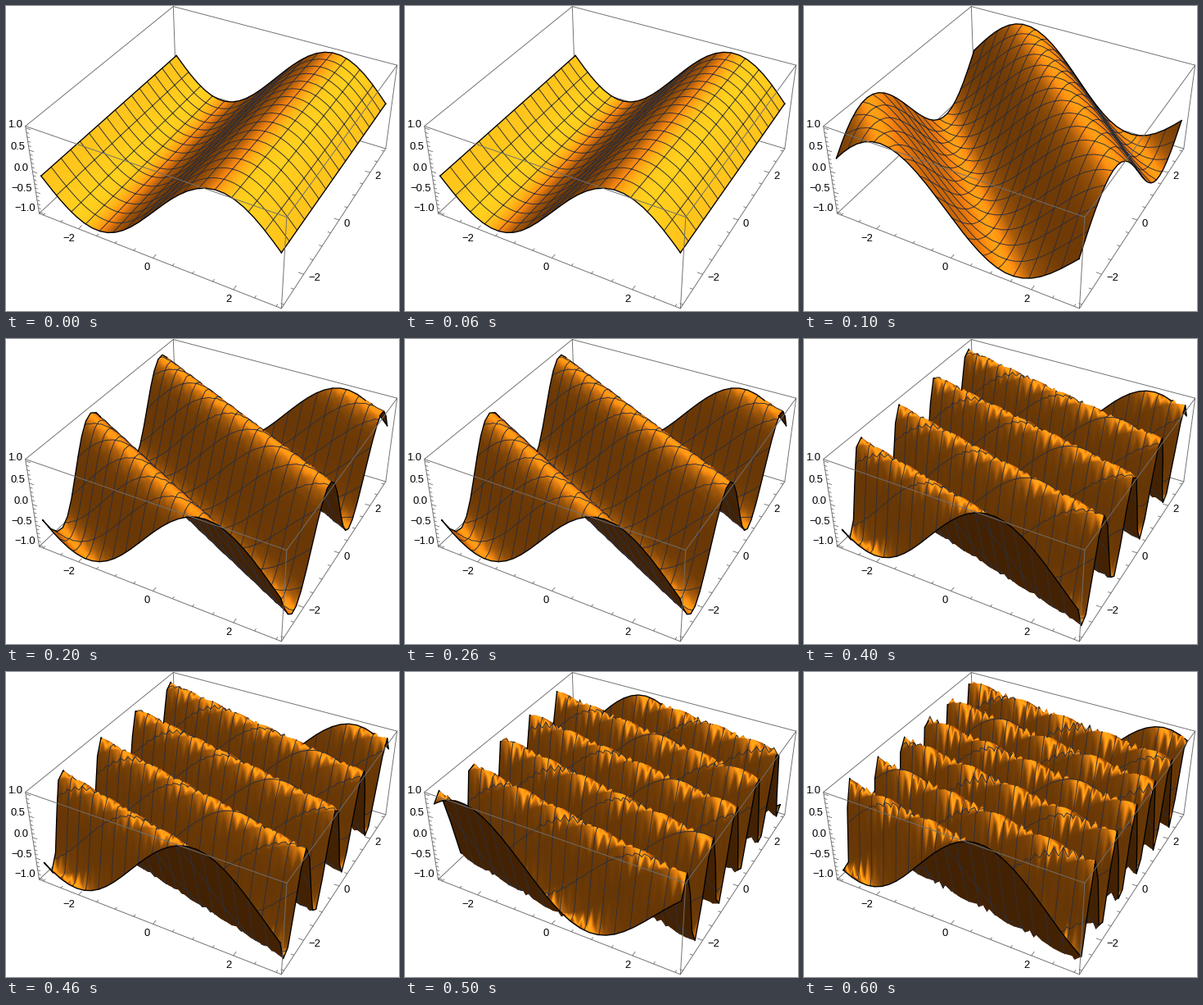
A matplotlib script for the animation above (700 ms loop, 480 px wide and 372 px high).

```python
import numpy as np
import matplotlib.pyplot as plt
from matplotlib.animation import FuncAnimation

W, H, SS = 480, 372, 2
PX = 0.72                      # one pixel in points at 100 dpi
R, PAD = 3.0, 1.04             # plot range and box padding
CELLS = 28
STEP = 2 * R / CELLS
FRAMES = 7

# camera: box of 1 x 1 x 0.4 seen in perspective
EYE = np.array([1.3, -2.4, 2.0])
DIST = np.linalg.norm(EYE)
BACK = EYE / DIST
RIGHT = np.cross([0, 0, 1], BACK)
RIGHT /= np.linalg.norm(RIGHT)
CAM = np.array([RIGHT, np.cross(BACK, RIGHT), BACK])
ZOOM, CX, CY = 1091, 262, 161.4

# material and lights
BASE = np.array([0.8807, 0.6110, 0.1421])
AMBIENT = np.array([0.3010, 0.2241, 0.0905])
LAMP = 0.3 * BASE
LIGHTS = np.array([[0, 1, 1], [1, 1, 1], [1, 0, 1]], float)
LIGHTS /= np.linalg.norm(LIGHTS, axis=1)[:, None]


def project(x, y, z):
    """Data coordinates to pixel x, pixel y and depth."""
    p = np.stack(np.broadcast_arrays(x / (2 * R * PAD), y / (2 * R * PAD),
                                     0.2 * z / PAD), -1) @ CAM.T
    depth = DIST - p[..., 2]
    return CX + ZOOM * p[..., 0] / depth, CY - ZOOM * p[..., 1] / depth, depth


def wave(x, y, k):
    return np.sin(x + k * y)


def on_mesh(k, x, y):
    """Height of the triangulated surface: each cell is cut by both diagonals."""
    s, t = (x + R) / STEP, (y + R) / STEP
    i = np.clip(np.floor(s + 1e-9), 0, CELLS - 1)
    j = np.clip(np.floor(t + 1e-9), 0, CELLS - 1)
    p, q = s - i - 0.5, t - j - 0.5

    def at(di, dj):
        return wave((i + di) * STEP - R, (j + dj) * STEP - R, k)

    return ((1 - 2 * np.maximum(abs(p), abs(q))) * at(0.5, 0.5)
            + np.maximum(-p - q, 0) * at(0, 0) + np.maximum(p - q, 0) * at(1, 0)
            + np.maximum(q - p, 0) * at(0, 1) + np.maximum(p + q, 0) * at(1, 1))


def vertices(k, start, count):
    """Screen positions and camera space normals of a square lattice."""
    g = start + STEP * np.arange(count)
    x, y = np.meshgrid(g, g, indexing="ij")
    u, v, d = project(x, y, wave(x, y, k))
    slope = 1.2 * np.cos(x + k * y)
    n = np.stack([-slope, -k * slope, np.ones_like(x)], -1)
    n /= np.linalg.norm(n, axis=-1, keepdims=True)
    return np.concatenate([np.stack([u * SS, v * SS, d], -1), n @ CAM.T], -1)


def triangles(k):
    corner = vertices(k, -R, CELLS + 1)
    centre = vertices(k, -R + STEP / 2, CELLS)
    for i in range(CELLS):
        for j in range(CELLS):
            ring = (corner[i, j], corner[i + 1, j],
                    corner[i + 1, j + 1], corner[i, j + 1])
            for n in range(4):
                yield ring[n], ring[(n + 1) % 4], centre[i, j]


def rasterize(k):
    depth = np.full((H * SS, W * SS), np.inf)
    norm = np.zeros((H * SS, W * SS, 3))
    for tri in triangles(k):
        tri = np.array(tri)
        (x0, y0, d0), (x1, y1, d1), (x2, y2, d2) = tri[:, :3].tolist()
        area = (x1 - x0) * (y2 - y0) - (y1 - y0) * (x2 - x0)
        if abs(area) < 1e-9:
            continue
        xa, xb = max(int(min(x0, x1, x2)), 0), min(int(max(x0, x1, x2)) + 1, W * SS)
        ya, yb = max(int(min(y0, y1, y2)), 0), min(int(max(y0, y1, y2)) + 1, H * SS)
        px = np.arange(xa, xb) + 0.5 - x0
        py = (np.arange(ya, yb) + 0.5 - y0)[:, None]
        w1 = (px * (y2 - y0) - py * (x2 - x0)) / area
        w2 = (py * (x1 - x0) - px * (y1 - y0)) / area
        w0 = 1 - w1 - w2
        d = w0 * d0 + w1 * d1 + w2 * d2
        zone = depth[ya:yb, xa:xb]
        hit = (w0 >= -1e-6) & (w1 >= -1e-6) & (w2 >= -1e-6) & (d < zone)
        zone[hit] = d[hit]
        w = np.stack([w0[hit], w1[hit], w2[hit]], -1)
        side = -1 if area > 0 else 1       # the underside is lit from its own side
        norm[ya:yb, xa:xb][hit] = side * (w @ tri[:, 3:])
    return depth, norm


def shade(n):
    n = n / np.linalg.norm(n, axis=1)[:, None]
    diffuse = np.zeros(len(n))
    gloss = np.zeros(len(n))
    for light in LIGHTS:
        half = light + [0, 0, 1]
        half /= np.linalg.norm(half)
        lit = n @ light
        diffuse += np.clip(lit, 0, None)
        gloss += np.where(lit > 0, np.clip(n @ half, 0, None) ** 3, 0)
    rgb = BASE * (AMBIENT + diffuse[:, None] * LAMP) + gloss[:, None] * LAMP
    return np.clip(rgb, 0, 1)


def visible_lines(k, depth, levels):
    """Screen path of the constant x and y lines, NaN where hidden."""
    pad = np.pad(depth, 1, mode="edge")
    far = np.max([pad[a:a + H * SS, b:b + W * SS]
                  for a in range(3) for b in range(3)], axis=0)
    run = np.linspace(-R, R, CELLS * 40 + 1)
    xs, ys = [], []
    for level in levels:
        fixed = np.full_like(run, level)
        for x, y in ((run, fixed), (fixed, run)):
            u, v, d = project(x, y, on_mesh(k, x, y))
            col = np.clip((u * SS).astype(int), 0, W * SS - 1)
            row = np.clip((v * SS).astype(int), 0, H * SS - 1)
            seen = d <= far[row, col] + 0.004
            xs += [np.where(seen, u, np.nan), [np.nan]]
            ys += [np.where(seen, v, np.nan), [np.nan]]
    return np.concatenate(xs), np.concatenate(ys)


def build(k):
    depth, norm = rasterize(k)
    hit = np.isfinite(depth)
    rgba = np.zeros((H * SS, W * SS, 4))
    rgba[hit, :3] = shade(norm[hit])
    rgba[hit, 3] = 1
    rgba = rgba.reshape(H, SS, W, SS, 4).mean(axis=(1, 3))
    rgba[..., :3] /= np.maximum(rgba[..., 3:], 1e-6)

    inner = np.linspace(-R, R, 17)[1:-1]
    return (np.clip(rgba, 0, 1), visible_lines(k, depth, inner),
            visible_lines(k, depth, (-R, R)))


fig = plt.figure(figsize=(W / 100, H / 100), dpi=100, facecolor="white")
ax = fig.add_axes([0, 0, 1, 1])
ax.set_xlim(0, W)
ax.set_ylim(H, 0)
ax.axis("off")

B, T = R * PAD, PAD
GRAY = "#707070"


def segment(p, q, order, width=0.95):
    ends = np.array([p, q], float)
    u, v, _ = project(ends[:, 0], ends[:, 1], ends[:, 2])
    ax.plot(u, v, color=GRAY, lw=width * PX, zorder=order, solid_capstyle="round")


def tick(p, axis, length, order):
    q = np.array(p, float)
    q[axis] += length * 2 * B
    segment(p, q, order, 0.85)


def label(x, y, text, align="center"):
    ax.text(x, y + 4.6, text.replace("-", "\u2212"), ha=align, va="baseline",
            family="Liberation Sans", fontsize=13 * PX, color="black", zorder=6)


# box edges: those meeting the near top corner lie over the surface
for s in (-B, B):
    for t in (-T, T):
        segment((-B, s, t), (B, s, t), 5 if (s, t) == (-B, T) else 1)
        segment((s, -B, t), (s, B, t), 5 if (s, t) == (B, T) else 1)
    for t in (-B, B):
        segment((s, t, -T), (s, t, T), 5 if t == -B else 1)

for n in range(-6, 7):
    size = 0.02 if n % 4 == 0 else 0.011
    tick((n / 2, -B, -T), 1, size, 1)
    tick((B, n / 2, -T), 0, -size, 1)
for n in range(-10, 11):
    tick((-B, -B, n / 10), 0, 0.02 if n % 5 == 0 else 0.011, 5)

for n, (lx, ly), (rx, ry) in ((-2, (76.5, 282), (376.5, 330.3)),
                              (0, (172.5, 317), (415.7, 264.5)),
                              (2, (272, 356.2), (454.2, 206.5))):
    label(lx, ly, str(n))
    label(rx, ry, str(n))
for n in range(-2, 3):
    u, v, _ = project(-B, -B, n / 2)
    label(u - 4.5, v - 5.3, f"{n / 2:.1f}", "right")

scenes = [build(k) for k in range(FRAMES)]
skin = ax.imshow(scenes[0][0], extent=(0, W, H, 0), aspect="auto",
                 interpolation="nearest", zorder=2)
mesh, = ax.plot([], [], color="#2e2e38", lw=0.95 * PX, zorder=3)
rim, = ax.plot([], [], color="black", lw=1.35 * PX, zorder=4)


def draw(i):
    image, inner, outer = scenes[i % FRAMES]
    skin.set_data(image)
    mesh.set_data(*inner)
    rim.set_data(*outer)
    return skin, mesh, rim


draw(0)
anim = FuncAnimation(fig, draw, frames=FRAMES, interval=100, repeat=True,
                     repeat_delay=0, blit=False)
plt.show()
```
